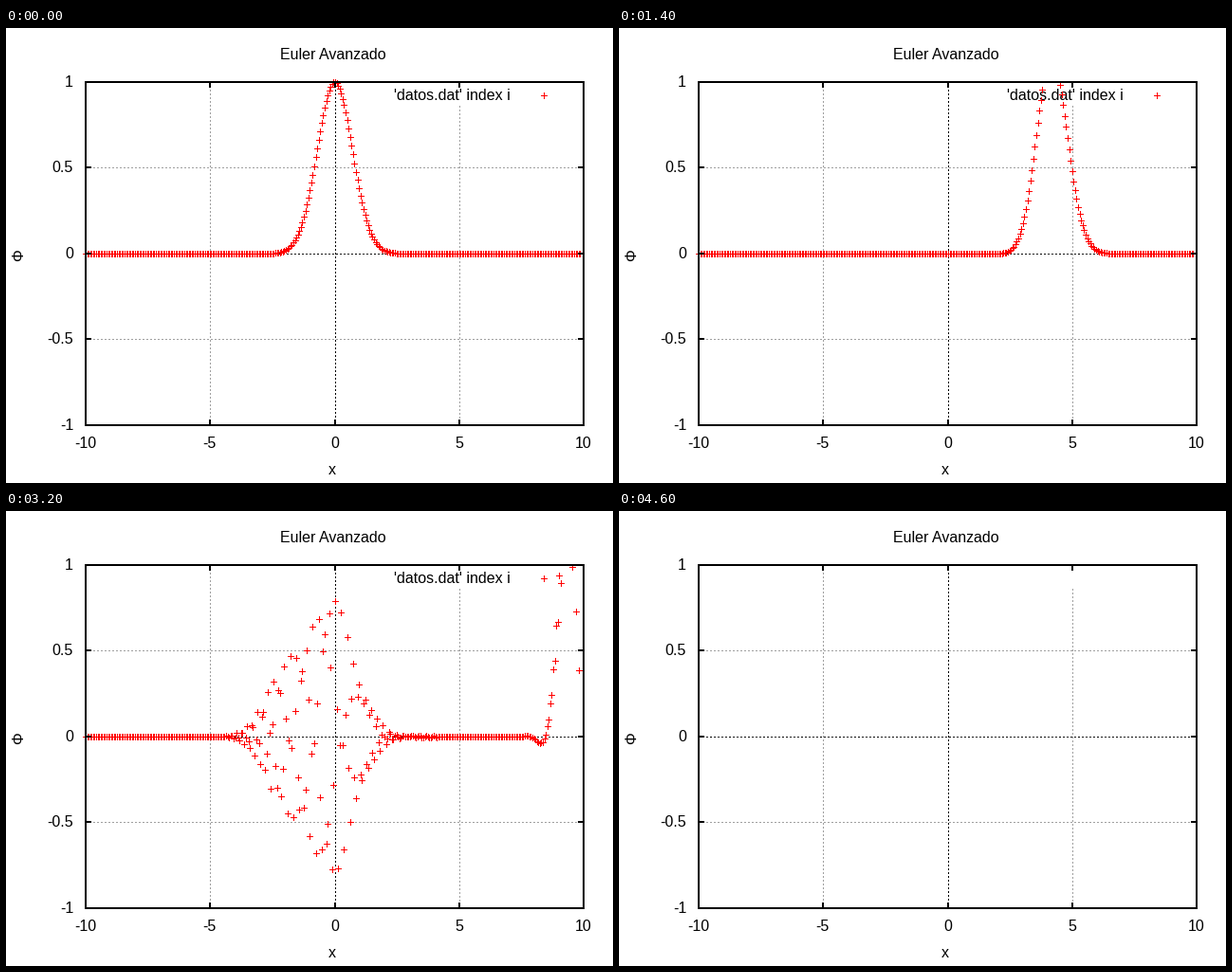
Animation, 640 px wide and 480 px high, one loop 5100 ms. Source, as a matplotlib script:

```python
import numpy as np
import matplotlib.pyplot as plt
from matplotlib.animation import FuncAnimation

plt.rcParams["font.family"] = "Liberation Sans"
plt.rcParams["path.simplify"] = False

PX = 0.72                                  # points per pixel at 100 dpi
LEFT, RIGHT, TOP, BOTTOM = 84, 609, 57, 419
DX, COURANT, STEPS = 0.06, 0.5, 10         # STEPS solver steps per picture
LAST = 46                                  # empty picture, held at the end

fig = plt.figure(figsize=(6.4, 4.8), dpi=100, facecolor="white")
ax = fig.add_axes([0, 0, 1, 1])
ax.set(xlim=(0, 640), ylim=(480, 0))
ax.axis("off")


def col(x):
    return np.floor(LEFT + (x + 10) * (RIGHT - LEFT) / 20 + 0.5)


def row(y):
    return 238 - np.floor(181 * y + 0.5)


def stroke(xs, ys, color="black", width=1, z=1, **kw):
    return ax.plot(xs, ys, color=color, lw=width * PX, zorder=z, snap=False,
                   solid_capstyle="butt", **kw)[0]


def dotted(xs, ys, color):
    stroke(xs, ys, color, ls=(0, (2, 2)))


def label(x, y, s, ha="center", va="baseline", **kw):
    return ax.text(x, y, s, size=16 * PX, ha=ha, va=va, zorder=2, **kw)


def crosses(cx, cy):
    """Seven-pixel plus signs as one broken line."""
    gap = np.full_like(cx, np.nan)
    xs = np.column_stack([cx - 3, cx + 4, gap, cx + 0.5, cx + 0.5, gap])
    ys = np.column_stack([cy + 0.5, cy + 0.5, gap, cy - 3, cy + 4, gap])
    return xs.ravel(), ys.ravel()


def solve():
    """Forward Euler in time, centred in space: unstable advection."""
    x = -10 + DX * np.arange(333)
    phi = np.exp(-x**2)
    states = [phi]
    for _ in range(LAST - 1):
        for _ in range(STEPS):
            new = phi.copy()
            new[1:-1] = phi[1:-1] - COURANT * (phi[2:] - phi[:-2]) / 2
            phi = new
        states.append(phi)
    return x[:-1], [s[:-1] for s in states]


def draw_axes():
    for v in (-10, -5, 0, 5, 10):
        c = col(v)
        label(c - (0.5 if v < 0 else 0), 443, str(v))
        if abs(v) < 10:
            start = 82 if v == 5 else TOP
            dotted([c + 0.5] * 2, [start, BOTTOM], "#a0a0a0" if v else "black")
            stroke([c, c], [TOP, TOP + 6], width=2, z=5)
            stroke([c, c], [BOTTOM - 6, BOTTOM], width=2, z=5)
    for v in (-1, -0.5, 0, 0.5, 1):
        r = row(v)
        label(71, r + 5, f"{v:g}", ha="right")
        if abs(v) < 1:
            dotted([LEFT, RIGHT], [r + 0.5] * 2, "#a0a0a0" if v else "black")
            stroke([LEFT, LEFT + 6], [r, r], width=2, z=5)
            stroke([RIGHT - 6, RIGHT], [r, r], width=2, z=5)
    ax.add_patch(plt.Rectangle((LEFT, TOP), RIGHT - LEFT, BOTTOM - TOP,
                               fill=False, lw=2 * PX, zorder=5, snap=False))
    label(289, 33, "Euler Avanzado", ha="left")
    label(344, 471, "x")
    label(13.5, 239.5, "Φ", va="center", rotation=90)


draw_axes()
key = label(409, 76, "'datos.dat' index i", ha="left")
marks = stroke([], [], "red", z=3)
x, states = solve()


def update(i):
    live = i < LAST
    key.set_visible(live)
    marks.set_visible(live)
    if live:
        phi = states[i]
        seen = np.abs(phi) <= 1
        marks.set_data(*crosses(np.append(col(x[seen]), 567.0),
                                np.append(row(phi[seen]), 71.0)))
    return key, marks


anim = FuncAnimation(fig, update, frames=51, interval=100, repeat=True,
                     repeat_delay=0)
plt.show()
```
